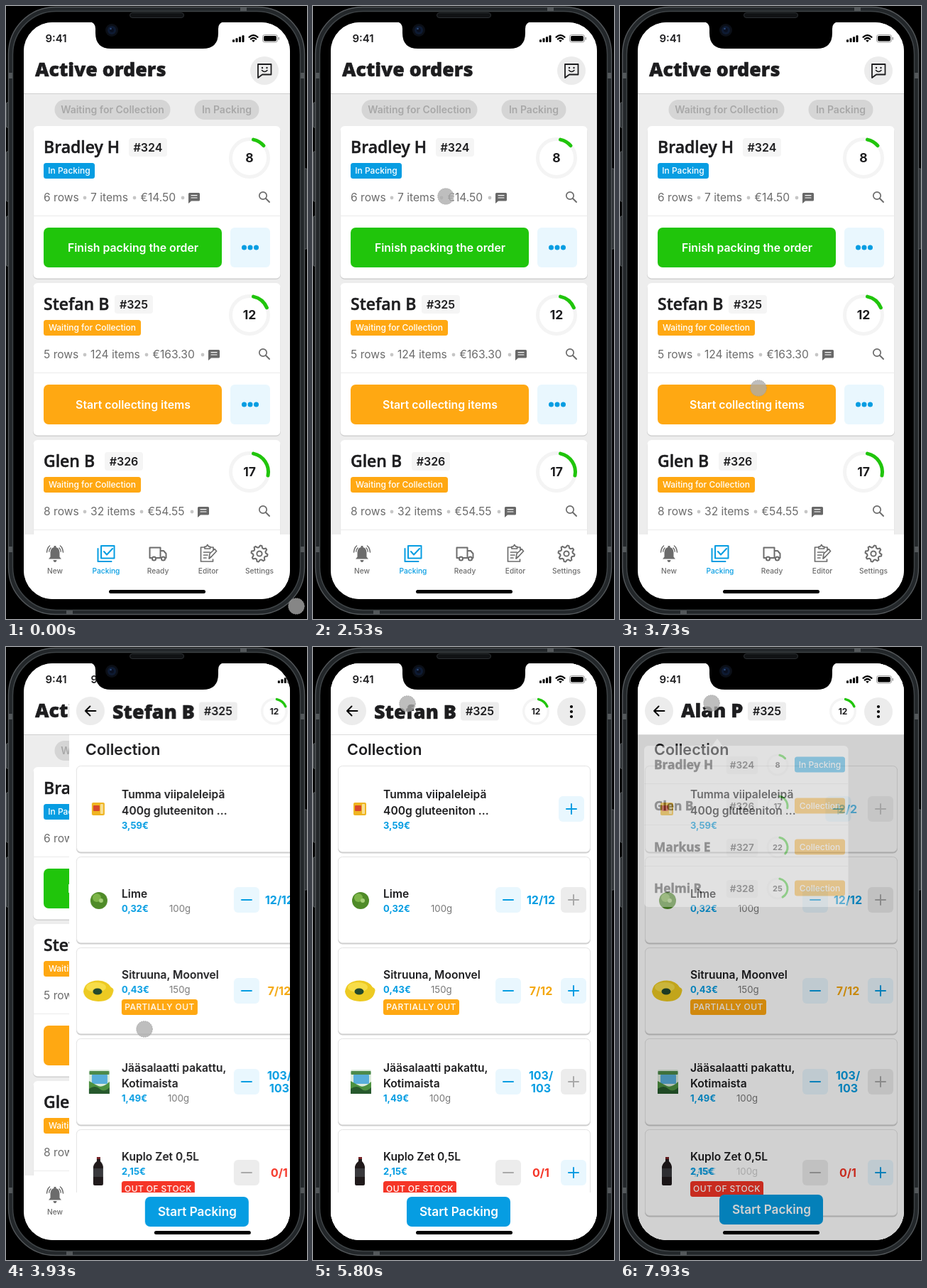
Write an HTML page that moves like this. It is 424 px wide and 863 px high and loops after 8000 ms.

```html
<!DOCTYPE html>
<html lang="en">
<head>
<meta charset="utf-8">
<title>Order packing</title>
<style>
html, body { margin: 0; height: 100%; overflow: hidden; background: #000; }
svg { display: block; width: 100vw; height: 100vh; font-family: Inter, "Liberation Sans", sans-serif; }
.head { font-family: "Open Sans", Lato, sans-serif; stroke: #1d1d1f; stroke-width: .5; stroke-linejoin: round; }
.line { fill: none; stroke-width: 2; stroke-linejoin: round; stroke-linecap: round; }

.cursor, .hints, .slide, .in, .out, .shift, .stepper, .bar, .count, .menu {
  animation: 8s linear infinite both;
}
.cursor { animation-name: cursor; }
.hints { animation-name: hints; }
.slide { animation-name: slide; }
.in { animation-name: in; }
.out { animation-name: out; }
.shift { animation-name: shift; }
.stepper { animation-name: stepper; }
.bar { animation-name: bar; }
.count { animation-name: count; }
.menu { animation-name: menu; }

@keyframes cursor {
  0%, .25% { transform: translate(409px, 845px); }
  3.375% { transform: translate(260px, 470px); }
  5.875% { transform: translate(183px, 292px); }
  6.625%, 8.36% { transform: translate(190px, 279px); }
  8.375%, 31.61% { transform: translate(187px, 269px); }
  31.625%, 32.75% { transform: translate(187px, 268px); }
  40% { transform: translate(191px, 406px); }
  43.375% { transform: translate(194px, 510px); }
  44.5%, 50.5% { transform: translate(195px, 538px); }
  54.125% { transform: translate(160px, 283px); }
  58.375% { transform: translate(151px, 158px); }
  65% { transform: translate(136px, 115px); }
  72.5%, 77.125% { transform: translate(133px, 80px); }
  79.125% { transform: translate(290px, 185px); }
  80.875% { transform: translate(373px, 231px); }
  81.625%, 83.75% { transform: translate(366px, 228px); }
  87.5% { transform: translate(350px, 208px); }
  94.125% { transform: translate(138px, 91px); }
  95.5%, 100% { transform: translate(129px, 79px); }
}
@keyframes hints {
  0%, 38.1% { opacity: 0; }
  39.1%, 40.6% { opacity: 1; }
  43.2%, 100% { opacity: 0; }
}
@keyframes slide {
  0%, 46.7% { transform: translate(375px, 0); animation-timing-function: ease-out; }
  50.45%, 100% { transform: none; }
}
@keyframes in {
  0%, 84.86% { opacity: 0; animation-timing-function: ease-out; }
  88.61%, 100% { opacity: 1; }
}
@keyframes out {
  0%, 84.86% { opacity: 1; animation-timing-function: ease-out; }
  88.61%, 100% { opacity: 0; }
}
@keyframes shift {
  0%, 84.86% { transform: none; animation-timing-function: ease-out; }
  88.61%, 100% { transform: translate(var(--dx), var(--dy)); }
}
@keyframes stepper {
  0%, 84.86% { transform: translate(364px, 228px); animation-timing-function: ease-out; }
  88.61%, 98.24% { transform: translate(275px, 228px); }
  99.125% { transform: translate(307px, 228px); }
  100% { transform: translate(333px, 228px); }
}
@keyframes bar {
  0%, 84.86% { opacity: 1; animation-timing-function: ease-out; }
  88.61%, 98.24% { opacity: 0; }
  99.125% { opacity: .36; }
  100% { opacity: .65; }
}
@keyframes count {
  0%, 84.86% { opacity: 0; animation-timing-function: ease-out; }
  88.61%, 98.24% { opacity: 1; }
  99.125% { opacity: .64; }
  100% { opacity: .35; }
}
@keyframes menu {
  0%, 98.24% { opacity: 0; }
  99.125% { opacity: .36; }
  100% { opacity: .65; }
}
</style>
</head>
<body>
<script>
const INK = '#1d1d1f', BLUE = '#069de2', PALE = '#e9f7fe', ORANGE = '#ffa812',
      RED = '#f53527', GREEN = '#20c50b', GREY = '#6c6c6c', EDGE = '#54585b';

const rect = (x, y, w, h, r, fill, more = '') =>
  `<rect x="${x}" y="${y}" width="${w}" height="${h}" rx="${r}" fill="${fill}" ${more}/>`;
const dot = (x, y, r, fill, more = '') => `<circle cx="${x}" cy="${y}" r="${r}" fill="${fill}" ${more}/>`;
const path = (d, fill) => `<path d="${d}" fill="${fill}"/>`;
const line = (d, color, w = 2) => `<path class="line" d="${d}" stroke="${color}" style="stroke-width:${w}"/>`;
const text = (x, y, s, size, weight, fill = INK, more = '') =>
  `<text x="${x}" y="${y}" font-size="${size}" font-weight="${weight}" fill="${fill}" ${more}>${s}</text>`;
const mid = (x, y, s, size, weight, fill, more = '') =>
  text(x, y, s, size, weight, fill, 'text-anchor="middle" ' + more);
const head = (x, y, s, size, weight) => text(x, y, s, size, weight, INK, 'class="head"');
const group = (cls, body, style = '') => `<g class="${cls}" style="${style}">${body}</g>`;
const at = (x, y, body) => `<g transform="translate(${x} ${y})">${body}</g>`;

function ring(x, y, r, w, deg, num, size) {
  const pt = a => {
    const t = a * Math.PI / 180;
    return `${(x + r * Math.sin(t)).toFixed(2)} ${(y - r * Math.cos(t)).toFixed(2)}`;
  };
  return dot(x, y, r, '#fff', `stroke="#f4f4f4" stroke-width="${w}"`) +
    line(`M${pt(12)}A${r} ${r} 0 0 1 ${pt(deg)}`, GREEN, w) +
    mid(x, y + size * .36, num, size, 700, INK);
}

function tag(x, y, w, h, s, fill, more) {
  return rect(x, y, w, h, 3.5, fill) + mid(x + w / 2, y + h / 2 + 4.3, s, 12, 500, '#fff', more);
}

function badge(x, y, s, fill) {
  return rect(x, y, 54, 26, 4, fill) + mid(x + 27, y + 18.8, s, 16, 600, INK);
}

const statusBar = mid(70.5, 51, '9:41', 15, 600, INK) +
  [0, 1, 2, 3].map(i => rect(319 + i * 4.5, 47.3 - i * 2, 3, 3.7 + i * 2, 1, '#000')).join('') +
  line('M342.5 43.8Q348.5 38.6 354.5 43.8M344.8 46.6Q348.5 43.4 352.2 46.6', '#000', 2.2) +
  path('M346.2 48.6Q348.5 46.8 350.8 48.6L348.5 51Z', '#000') +
  rect(361.5, 40.5, 21, 10.5, 3, 'none', 'stroke="#999"') +
  rect(363, 42, 18, 7.5, 1.8, '#000') + rect(383.6, 43.8, 1.4, 4, .7, '#999');
const homeBar = rect(145, 822, 136, 5, 2.5, '#000');

// ---- order list ----
function orderCard(y, o) {
  const note = o.dots[2] + 8;
  return at(0, y,
    rect(38, 1.5, 349, 214.5, 7, '#cfcfcf') + rect(38.5, 0, 348, 214.5, 6, '#fff') +
    head(53, 38, o.name, 23, 600) + badge(o.badge, 17, o.id, '#f5f5f5') +
    tag(53, 52, o.tagW, 22, o.tag, o.tagFill) +
    ring(343, 45, 26.5, 5, o.deg, o.num, 17.5) +
    text(53, 106, o.rows, 15.6, 400, GREY) + text(o.dots[0] + 8, 106, o.items, 15.6, 400, GREY) +
    text(o.dots[1] + 8.5, 106, o.sum, 15.6, 400, GREY) +
    o.dots.map(x => dot(x, 101, 2.4, '#c6c6c6')).join('') +
    path(`M${note + 1.5} 94h13q1.5 0 1.5 1.5v8.5q0 1.5-1.5 1.5h-10.5l-4 3.5v-13.5q0-1.5 1.5-1.5z`, '#686868') +
    line(`M${note + 4} 97.7h8M${note + 4} 101h8`, '#fff', 1.2) +
    dot(362, 98, 5.2, 'none', `stroke="${GREY}" stroke-width="1.7"`) + line('M366 102l5 5', GREY, 1.9) +
    rect(38.5, 126, 348, 1, 0, '#ebebeb') +
    rect(53, 143, 251, 56, 7, o.fill) + mid(179, 177, o.action, 15.8, 600, '#fff') +
    rect(316, 143, 56, 56, 6, PALE) + [335.5, 344, 352.5].map(x => dot(x, 171, 3.5, BLUE)).join(''));
}

const waiting = { tag: 'Waiting for Collection', tagW: 137, tagFill: ORANGE, action: 'Start collecting items', fill: ORANGE };
const orders = [
  { name: 'Bradley H', id: '#324', badge: 173, tag: 'In Packing', tagW: 72, tagFill: BLUE, deg: 49, num: 8,
    rows: '6 rows', items: '7 items', sum: '€14.50', dots: [111, 181, 249], action: 'Finish packing the order', fill: GREEN },
  { ...waiting, name: 'Stefan B', id: '#325', badge: 153, deg: 67, num: 12,
    rows: '5 rows', items: '124 items', sum: '€163.30', dots: [111, 198, 277] },
  { ...waiting, name: 'Glen B', id: '#326', badge: 139, deg: 101, num: 17,
    rows: '8 rows', items: '32 items', sum: '€54.55', dots: [111, 191, 262] }
];

const pill = (x, w, s) => rect(x, 132, w, 28, 14, '#d5d5d5') + mid(x + w / 2, 151, s, 14, 600, '#a8a8a8');

const gear = (() => {
  let d = '';
  for (let i = 0; i < 32; i++) {
    const a = (i + .5) * Math.PI / 16, r = i % 4 < 2 ? 11.6 : 8.8;
    d += (i ? 'L' : 'M') + (Math.sin(a) * r).toFixed(1) + ' ' + (-Math.cos(a) * r).toFixed(1);
  }
  return line(d + 'Z', GREY) + dot(0, 0, 3.6, 'none', `stroke="${GREY}" stroke-width="2"`);
})();

const tabs = [
  [69, 'New', GREY, path('M-9 7.5L-6.5 4.5V-2Q-6-8-1.5-9V-11H1.5V-9Q6-8 6.5-2V4.5L9 7.5ZM-2.5 9H2.5Q2 12 0 12T-2.5 9Z', GREY) +
    line('M-11.5-2Q-11-8-7.5-11M11.5-2Q11-8 7.5-11M-8.2-3Q-8-6-6-8M8.2-3Q8-6 6-8', GREY, 1.5)],
  [141, 'Packing', BLUE, line('M-7-11H11.5V6.5H-7ZM-11.5-7V11H7.5M-3-3L1 1.5L9-7', BLUE)],
  [214, 'Ready', GREY, line('M-8 6H-11.5V-8.5H3.5V6H-3M3.5-4H8L11.5 0V6H10.5M3.5 6H5', GREY) +
    dot(-5.5, 7, 2.6, '#fff', `stroke="${GREY}" stroke-width="2"`) + dot(7.5, 7, 2.6, '#fff', `stroke="${GREY}" stroke-width="2"`)],
  [285, 'Editor', GREY, line('M-5-9H-10.5V11H6.5V8M2.5-9H7V-5M-5-7V-10H-3L-1.2-12.5L.5-10H2.5V-7ZM-6.5-2H2M-6.5 2H-1M-6.5 6H-3M1 7L2 0L9-6.5L11.5-3.5L4.5 4Z', GREY, 1.7)],
  [357, 'Settings', GREY, gear]
];

const hint = (x, y, w, h) => rect(x, y, w, h, 0, 'rgba(0,160,235,.13)', 'stroke="rgba(0,160,235,.2)"');

const listScreen =
  rect(25, 23, 375, 812, 0, '#ededed') +
  orders.map((o, i) => orderCard(169 + i * 221, o)).join('') +
  pill(68.5, 163, 'Waiting for Collection') + pill(265.5, 91, 'In Packing') +
  rect(25, 23, 375, 101, 0, '#fff') + rect(25, 123, 375, 1, 0, '#cfcfcf') + statusBar +
  head(41, 99, 'Active orders', 26.8, 800) +
  dot(364, 91, 20, '#ececec') +
  line('M355 82H373.5V96.5H361L355 101Z', INK, 1.8) + line('M360.5 90.5Q364.2 94.5 368 90.5', INK, 1.6) +
  dot(361, 87, 1.2, INK) + dot(367.5, 87, 1.2, INK) +
  rect(25, 744, 375, 91, 0, '#fff') +
  tabs.map(([x, s, c, icon]) => at(x, 771, icon) + mid(x, 799, s, 10.2, 500, c)).join('') + homeBar +
  group('hints', hint(68.5, 132.5, 162, 27) + hint(266, 132.5, 90, 27) + hint(53, 533, 251, 56) +
    hint(316.5, 533.5, 55, 55) + hint(57.5, 758.5, 23, 43) + hint(201.5, 758.5, 24, 43));

// ---- order details ----
const MINUS = 'M-7 0H7', UP = 'M0-7V7';
const box = on => rect(-18, -18, 36, 36, 6, on ? PALE : '#ececec');
const button = (x, y, d, on) => at(x, y, box(on) + line(d, on ? BLUE : '#a9a9a9'));
const count = (y, s, c) => mid(321, y, s, 16, 700, c);
const price = (y, s, grams, x) => text(99, y, s, 13, 700, BLUE) + (grams ? text(x, y, grams, 13.2, 400, '#777') : '');
const label = (y, s) => text(99, y, s, 15.6, 600);

function amount(y, s, color, less, more) {
  return button(275, y, MINUS, less) + button(367, y, MINUS + UP, more) + (s ? count(y + 6, s, color) : '');
}

const bread = rect(57, 219, 18, 18, 2, '#efb421') + rect(59, 223, 9, 8, 1, '#d8482a') + rect(69, 221, 4, 14, 1, '#f8df93');
const lime = dot(67, 357, 12, '#4f8b28') + dot(64, 353, 6, '#7db548') + dot(70, 357, 3, '#a5cf78');
const lemon = path('M45 485Q47 470 66 469.5Q79 470 84 479Q89 481 87 486Q84 499 66 499Q47 498 45 485Z', '#edca22') +
  '<ellipse cx="63" cy="479" rx="14" ry="7" fill="#f7dd48"/><ellipse cx="65" cy="485" rx="6.5" ry="4.5" fill="#23492c"/>';
const salad = rect(53, 595, 29, 34, 2, '#dcebdc') + rect(53.5, 597, 28, 5, 1, '#4d8a4a') + rect(57, 602, 22, 13, 1, '#58aeda') +
  path('M53 611Q60 615 66 618T82 612V627H53Z', '#4c9140') + path('M53 622Q62 616 68 622T82 620V629H53Z', '#27592d');
const cola = path('M64 718H69V724Q73 728 73 733V756Q73 758 71 758H61Q59 758 59 756V733Q59 728 64 724Z', '#201a1b') +
  rect(59, 734, 14, 12, 0, '#39393c') + rect(64, 718, 5, 3, 1, '#7c2327');

const cards = [0, 1, 2, 3, 4].map(i =>
  rect(35, 168 + i * 128, 356, 122.5, 6.5, '#cfcfcf') +
  rect(35.5, 167.5 + i * 128, 355, 121, 6, '#fff', 'stroke="#e4e4e4"')).join('');

const rows = bread + label(213, 'Tumma viipaleleipä') + label(236, '400g gluteeniton ...') + price(256, '3,59€') +
  group('count', button(367, 228, MINUS + UP, false)) +
  group('stepper', box(true) + line(MINUS, BLUE) + group('bar', line(UP, BLUE))) +
  group('count', count(234, '2/2', BLUE)) +
  lime + label(353, 'Lime') + price(373, '0,32€', '100g', 166) + amount(356, '12/12', BLUE, true, false) +
  lemon + label(467, 'Sitruuna, Moonvel') + price(487, '0,43€', '150g', 166) +
  tag(99, 496, 107, 22, 'PARTIALLY OUT', ORANGE, 'letter-spacing=".4"') + amount(484, '7/12', '#f4a70f', true, true) +
  salad + label(598, 'Jääsalaatti pakattu,') + label(620, 'Kotimaista') + price(640, '1,49€', '100g', 164) +
  amount(612, '', BLUE, true, false) + count(609, '103/', BLUE) + count(627, '103', BLUE) +
  cola + label(723, 'Kuplo Zet 0,5L') + price(743, '2,15€') +
  group('menu', price(743, '1,49€', '100g', 164)) +
  tag(99, 752, 103, 22, 'OUT OF STOCK', RED, 'letter-spacing=".4"') + amount(740, '0/1', RED, false, true);

const menuRows = [
  ['Bradley H', '#324', 8, 49, 'In Packing', BLUE],
  ['Glen B', '#326', 17, 101, 'Collection', ORANGE],
  ['Markus E', '#327', 22, 130, 'Collection', ORANGE],
  ['Helmi R', '#328', 25, 150, 'Collection', ORANGE]
];
const shade = rect(25, 124, 375, 711, 0, '#000', 'opacity=".5"');
const menu = path('M129 140L137 129L145 140Z', '#fff') + rect(34, 139, 287.5, 227, 6, '#fff') +
  menuRows.map(([name, id, num, deg, s, fill], i) => at(0, i * 58,
    head(48, 172, name, 17.3, 700) + rect(150, 154, 44, 25, 4, '#f0f0f0') + mid(172, 171, id, 13.5, 600, INK) +
    ring(222, 166, 14, 3, deg, num, 11) + tag(246, 154.5, 71, 22, s, fill) +
    (i < 3 ? rect(34, 192, 287.5, 1, 0, '#e5e5e5') : ''))).join('');

const detailScreen =
  rect(25, 23, 375, 812, 0, '#fff') + cards + rows +
  text(48, 152, 'Collection', 21.6, 600) +
  group('out', rect(25, 768, 375, 67, 0, '#fff')) +
  group('shift', rect(132, 774, 146, 42, 7, BLUE) + mid(205.5, 801, 'Start Packing', 17.2, 600, '#fff'), '--dx:8px;--dy:-3px') +
  homeBar + group('menu', shade) + group('menu', menu) +
  rect(25, 23, 375, 101, 0, '#fff') + rect(25, 123, 375, 1, 0, '#dcdcdc') + statusBar +
  dot(55, 90, 20, '#ececec') + line('M62.5 90H48M54.5 83.5L48 90L54.5 96.5', '#000', 1.9) +
  group('out', head(86, 101, 'Stefan B', 27, 800)) + group('in', head(86, 99, 'Alan P', 27, 800)) +
  group('shift', badge(208, 77.5, '#325', '#ededed'), '--dx:-28px;--dy:0px') +
  ring(314, 90.5, 17.3, 3.4, 67, 12, 12) +
  dot(364, 91, 20, '#ececec') + [84, 91, 98].map(y => dot(364, y, 2.1, '#000')).join('');

// ---- phone ----
const bands = [[4, 94, 6, 8], [4, 761, 6, 8], [414, 94, 6, 8], [414, 761, 6, 8], [330, 2, 9, 6], [85, 850, 9, 6]];
const key = (x, y, h) => rect(x, y, 4, h, 1, '#2a2e31', `stroke="${EDGE}"`);
const body = key(.5, 136, 35) + key(.5, 205, 70) + key(.5, 296, 70) + key(420, 229, 113) +
  rect(3.5, 1.5, 417, 855, 66, '#23272a', `stroke="${EDGE}" stroke-width="1.4"`) +
  bands.map(([x, y, w, h]) => rect(x, y, w, h, 0, EDGE)).join('') +
  rect(9.5, 7.5, 405, 843, 61, '#000', 'stroke="#3e4346" stroke-width="1.5"') +
  rect(174.5, 9.5, 76, 7, 3.5, '#101214', 'stroke="#2b2f32"');
const notch = path('M117 22Q126 23 126 32V38Q126 60 148 60H277Q299 60 299 38V32Q299 23 308 22Z', '#000') +
  dot(149, 34, 9, '#0b0f17') + dot(149, 34, 6, '#0e1b33') + dot(149, 34, 3, '#0a1020') + dot(147.5, 32, 1.3, '#2c4a78');

document.body.innerHTML = `<svg viewBox="0 0 424 863">
  <clipPath id="screen">${rect(25, 23, 375, 812, 41, '#fff')}</clipPath>
  ${body}
  <g clip-path="url(#screen)">${listScreen}${group('slide', detailScreen)}</g>
  ${notch}
  ${group('cursor', dot(0, 0, 11.3, 'rgba(172,172,172,.78)') +
    dot(0, 0, 11.3, 'none', 'stroke="rgba(150,150,150,.7)" stroke-dasharray="1.6 1.4"'))}
</svg>`;
</script>
</body>
</html>
```
